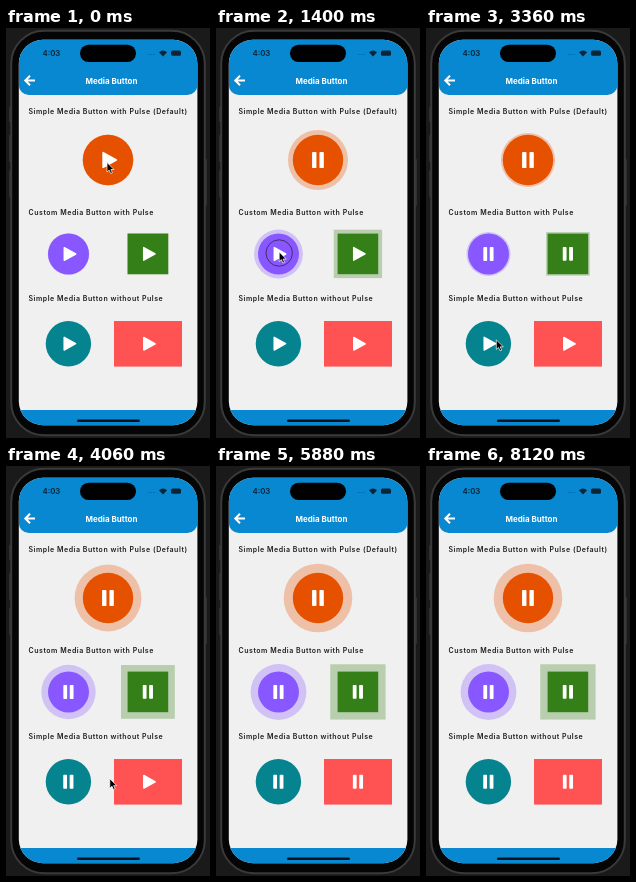
These frames come from a looping animation (204x410 px, 8260 ms). An HTML page:

```html
<!DOCTYPE html>
<html lang="en">
<head>
<meta charset="utf-8">
<title>Media Button</title>
<style>
  html, body { margin: 0; width: 100%; height: 100%; overflow: hidden; background: #1a1a1a; }
  svg { display: block; width: 204px; height: 410px; font-family: Inter, sans-serif; }
  .soft { filter: blur(.45px); }
  .label { font-size: 7px; font-weight: 600; letter-spacing: .53px; fill: #1c1c1e; }
  .halo { opacity: .3; }
  .icon { fill: #fff; stroke: #fff; stroke-width: 1.5; stroke-linejoin: round; }
</style>
</head>
<body>
<svg viewBox="0 0 204 410">
  <defs>
    <clipPath id="screen"><rect x="12.8" y="11.8" width="178.6" height="385.4" rx="24"/></clipPath>
  </defs>

  <rect width="204" height="410" fill="#1a1a1a"/>
  <g class="soft">
    <g fill="#303030">
      <rect x="3" y="79" width="3" height="15" rx="1"/>
      <rect x="3" y="107" width="3" height="27" rx="1"/>
      <rect x="3" y="142" width="3" height="27" rx="1"/>
      <rect x="198" y="131" width="3" height="47" rx="1"/>
    </g>
    <rect x="5.2" y="2.7" width="193.6" height="404.6" rx="33" fill="#050505" stroke="#3a3a3a" stroke-width="2"/>

    <g clip-path="url(#screen)">
      <rect x="12" y="11" width="180" height="387" fill="#f0f0f0"/>
      <rect x="12.8" y="0" width="178.6" height="67" rx="10" fill="#0788d1"/>
      <rect x="12" y="382" width="180" height="16" fill="#0788d1"/>
      <rect x="71" y="391.6" width="63" height="2.4" rx="1.2" fill="#06131c"/>
    </g>
    <rect x="74" y="16.7" width="56" height="17.2" rx="8.6" fill="#000"/>

    <g fill="#0a2438">
      <text x="36.5" y="28" font-size="7.8" font-weight="600">4:03</text>
      <g opacity=".5">
        <circle cx="143" cy="26.5" r=".6"/>
        <circle cx="145.5" cy="26.5" r=".6"/>
        <circle cx="148" cy="26.5" r=".6"/>
      </g>
      <path d="M153 24.2Q157 20.8 161 24.2L157 28.5Z"/>
      <rect x="165" y="22.5" width="10" height="5.2" rx="1.5"/>
    </g>
    <path d="M29 52.5H19.5M24 47.8L19.3 52.5L24 57.2" fill="none" stroke="#fff" stroke-width="2"/>
    <text x="105.5" y="56" font-size="8" font-weight="700" fill="#fff" text-anchor="middle">Media Button</text>

    <text class="label" x="22.5" y="86.3">Simple Media Button with Pulse (Default)</text>
    <text class="label" x="22.5" y="186.5">Custom Media Button with Pulse</text>
    <text class="label" x="22.5" y="273">Simple Media Button without Pulse</text>

    <g id="buttons"></g>

    <g id="cursor">
      <circle id="press" cy="1" r="13.2" fill="none" stroke="#2a2340" stroke-opacity=".75"/>
      <path d="M0 0V9.6L2.2 7.6L3.7 11L5.4 10.3L3.9 7H7Z" fill="#000" stroke="#fff" stroke-width=".7"/>
    </g>
  </g>
</svg>

<script>
const LOOP = 8260, STEP = 140, PULSE = 1755;
const NS = 'http://www.w3.org/2000/svg';
const $ = id => document.getElementById(id);

// w, h: half sizes; tap: moment the icon flips to pause
const buttons = [
  { x: 102, y: 132, w: 25.2, h: 25.2, color: '#e65100', round: true, pulse: true, icon: 1.15, tap: 280 },
  { x: 62.5, y: 226, w: 20.5, h: 20.5, color: '#8857ff', round: true, pulse: true, icon: 1, tap: 1540 },
  { x: 141.9, y: 225.9, w: 20.3, h: 20.3, color: '#357f18', pulse: true, icon: 1, tap: 2520 },
  { x: 62.4, y: 315.7, w: 22.7, h: 22.7, color: '#05838f', round: true, icon: 1, tap: 3640 },
  { x: 142, y: 315.8, w: 34, h: 22.8, color: '#ff5253', icon: 1, tap: 4900 }
];

// time, x, y of the pointer tip
const path = [
  [0, 101, 134.5], [420, 101, 134.5], [1120, 63.2, 224], [1540, 63.2, 224],
  [2240, 141, 225], [2660, 141, 225], [3220, 70.3, 311.8], [3780, 70.3, 311.8],
  [4340, 137.3, 313.5], [4900, 137.3, 313.5], [5460, -14, 315]
];

function add(parent, tag, attrs) {
  const el = document.createElementNS(NS, tag);
  for (const k in attrs) el.setAttribute(k, attrs[k]);
  return parent.appendChild(el);
}

function shape(parent, b, cls) {
  const box = b.round
    ? { r: b.w }
    : { x: -b.w, y: -b.h, width: 2 * b.w, height: 2 * b.h };
  return add(parent, b.round ? 'circle' : 'rect', { ...box, fill: b.color, class: cls });
}

for (const b of buttons) {
  const g = add($('buttons'), 'g', { transform: `translate(${b.x} ${b.y})` });
  if (b.pulse) b.halo = shape(g, b, 'halo');
  shape(g, b, 'face');
  const icon = { class: 'icon', transform: `scale(${b.icon})` };
  b.play = add(g, 'path', { ...icon, d: 'M-4.2-6.3V6.3L7.2 0Z' });
  b.pause = add(g, 'path', { ...icon, d: 'M-4.4-6.2h2.3V6.2h-2.3ZM2-6.2h2.3V6.2H2Z' });
}

function tipAt(t) {
  const i = path.findIndex(p => p[0] > t);
  if (i < 0) return path[path.length - 1].slice(1);
  const [a, b] = [path[i - 1], path[i]];
  const u = (t - a[0]) / (b[0] - a[0]);
  const e = u * u * (3 - 2 * u);
  return [a[1] + (b[1] - a[1]) * e, a[2] + (b[2] - a[2]) * e];
}

function draw(t) {
  const phase = ((t + 20) % PULSE) / PULSE;
  const scale = 1.5 - Math.abs(phase - .5);
  let pressed = false;
  for (const b of buttons) {
    const on = t >= b.tap;
    b.play.style.display = on ? 'none' : '';
    b.pause.style.display = on ? '' : 'none';
    if (b.halo) b.halo.setAttribute('transform', `scale(${scale})`);
    pressed = pressed || (t >= b.tap - STEP && !on);
  }
  $('press').style.display = pressed ? '' : 'none';
  $('cursor').setAttribute('transform', `translate(${tipAt(t)})`);
}

const start = performance.now();
function tick() {
  const t = (performance.now() - start) % LOOP;
  draw(Math.floor(t / STEP) * STEP);
  requestAnimationFrame(tick);
}
tick();
</script>
</body>
</html>
```
